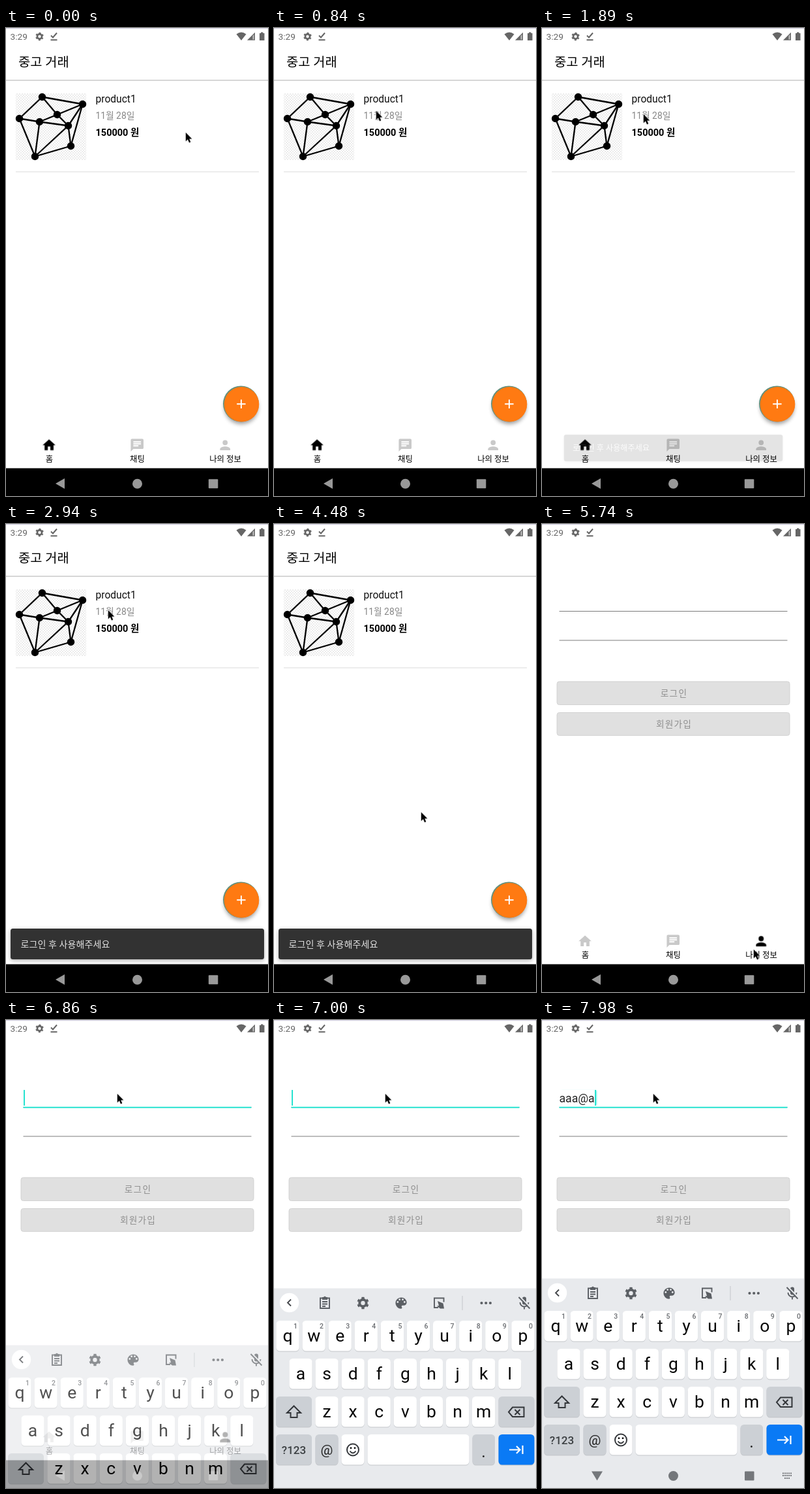
These frames come from a looping animation (402 px wide and 716 px high, 8 s). An HTML page:

```html
<!DOCTYPE html>
<html lang="ko">
<head>
<meta charset="utf-8">
<title>중고 거래</title>
<style>
  html, body { margin: 0; width: 100%; height: 100%; overflow: hidden; background: #fff; }
  #stage { position: relative; width: 402px; height: 716px; overflow: hidden; background: #fff; }
  svg { position: absolute; left: 0; top: 0; display: block; }
  svg, #typed { font-family: Roboto, 'Noto Sans CJK KR', 'Noto Sans CJK', sans-serif; }
  .mid { text-anchor: middle; }
  .label { font-size: 12.4px; text-anchor: middle; }
  .button { font-size: 13.7px; letter-spacing: 1.2px; text-anchor: middle; font-weight: 500; fill: #8e8e8e; }
  .key { font-size: 26.5px; text-anchor: middle; fill: #060606; }
  .hint { font-size: 10.5px; text-anchor: middle; font-weight: 500; fill: #6a6d71; }
  .line { fill: none; stroke: currentColor; }

  .loop { animation: 8s step-end infinite; }
  #home, .homeNav { animation-name: first; }
  #login, .loginNav { animation-name: second; }
  #focus, #typed { animation-name: focus; }
  #cursor { animation: move 8s linear infinite; }
  #ring { animation-name: click; }
  #snack { transform-origin: 201.5px 642.5px; animation: snackFade 8s linear infinite, snackScale 8s linear infinite; }
  #keyboard { animation-name: rise; }
  #systemNav { animation-name: dim; }
  #imeNav { animation-name: imeNav; }
  #tools { animation: tools 8s linear infinite; }
  #chevron { transform-origin: 23.5px 417.5px; animation-name: flip; }

  #typed { position: absolute; left: 26.5px; top: 107px; height: 24px; line-height: 26px; font-size: 17.6px; color: #222; }
  #typed span { display: block; height: 24px; overflow: hidden; white-space: pre; width: 0;
    border-right: 2px solid #26e2d0; box-shadow: 2px 0 2px -1px #7ff2e8; animation-name: type; }

  @keyframes first { 0% { opacity: 1 } 70.875%, 100% { opacity: 0 } }
  @keyframes second { 0% { opacity: 0 } 70.875%, 100% { opacity: 1 } }
  @keyframes focus { 0% { opacity: 0 } 82.25%, 100% { opacity: 1 } }
  @keyframes move {
    0% { translate: 276px 160px }
    2.625% { translate: 276px 160px; animation-timing-function: steps(7) }
    8.75% { translate: 157px 127px; animation-timing-function: step-end }
    19.25% { translate: 156px 132px; animation-timing-function: step-end }
    36.75% { translate: 157px 132px }
    39.375% { translate: 157px 132px; animation-timing-function: steps(6) }
    44.625% { translate: 225px 433px }
    49.875% { translate: 225px 433px; animation-timing-function: steps(2) }
    51.625% { translate: 226px 441px }
    56% { translate: 226px 441px; animation-timing-function: steps(11) }
    65.625% { translate: 321px 652px; animation-timing-function: steps(2) }
    67.375% { translate: 325px 651px }
    71.75% { translate: 325px 651px; animation-timing-function: steps(8) }
    78.75%, 100% { translate: 171px 113px }
  }
  @keyframes click {
    0%, 10.5%, 21%, 70.875%, 82.25%, 100% { opacity: 0 }
    8.75%, 19.25%, 69.125%, 80.5% { opacity: 1 }
  }
  @keyframes snackFade {
    0%, 23.3125%, 61.25%, 100% { opacity: 0 }
    25.8125%, 60.125% { opacity: 1 }
  }
  @keyframes snackScale {
    0% { scale: .8 }
    23.3125% { scale: .8; animation-timing-function: cubic-bezier(0, 0, .3, 1) }
    25.8125%, 100% { scale: 1 }
  }
  @keyframes rise {
    0% { translate: 0 321px; opacity: 0 }
    84.875% { translate: 0 165px; opacity: .35 }
    85.75% { translate: 0 102px; opacity: .7 }
    86.625% { translate: 0 48px; opacity: .9 }
    87.5% { translate: 0 15px; opacity: 1 }
    88.375%, 100% { translate: 0 0; opacity: 1 }
  }
  @keyframes dim { 0% { opacity: 1 } 84.875%, 100% { opacity: .5 } }
  @keyframes imeNav { 0% { opacity: 0 } 88.375%, 100% { opacity: 1 } }
  @keyframes type {
    0% { width: 0 }
    89.25% { width: .544em }
    91% { width: 1.088em }
    92.75% { width: 1.632em }
    95.375% { width: 2.53em }
    99.75%, 100% { width: 3.074em }
  }
  @keyframes tools {
    0%, 90.999% { opacity: 1 }
    91%, 95.5% { opacity: 0 }
    98%, 100% { opacity: 1 }
  }
  @keyframes flip { 0%, 96.25%, 100% { scale: 1 1 } 91% { scale: -1 1 } }
</style>
</head>
<body>
<div id="stage">
<svg width="402" height="716" viewBox="0 0 402 716">
  <defs>
    <pattern id="checker" width="4" height="4" patternUnits="userSpaceOnUse">
      <path fill="#fff" d="M0 0h4v4H0z"/><path fill="#ececec" d="M0 0h2v2H0zM2 2h2v2H2z"/>
    </pattern>
    <filter id="blur" x="-30%" y="-30%" width="160%" height="160%"><feGaussianBlur stdDeviation="3"/></filter>
    <g id="gear">
      <circle class="line" r="5.2" stroke-width="4"/>
      <circle class="line" r="7.8" stroke-width="2.8" pathLength="12" stroke-dasharray="1" stroke-dashoffset=".5" transform="rotate(30)"/>
    </g>
    <path id="house" d="M10 20v-6h4v6h5v-8h3L12 3 2 12h3v8z"/>
    <path id="chat" d="M20 2H4c-1.1 0-2 .9-2 2v18l4-4h14c1.1 0 2-.9 2-2V4c0-1.1-.9-2-2-2zM6 9h12v2H6zm8 5H6v-2h8zm4-6H6V6h12z"/>
    <path id="person" d="M12 12a4 4 0 1 0 0-8 4 4 0 0 0 0 8zm0 2c-2.7 0-8 1.3-8 4v2h16v-2c0-2.7-5.3-4-8-4z"/>
  </defs>

  <path stroke="#d6d4e4" stroke-width="1.5" d="M0 .5h402"/>
  <g fill="#666" color="#666">
    <text x="6.5" y="18" font-size="13.7">3:29</text>
    <use href="#gear" transform="translate(51.5 13) scale(.68)"/>
    <path class="line" stroke-width="2" d="M69 11.5l3 3 6-7M68.5 18.2h10"/>
    <path d="M353.5 9.5q7.5-6 15 0l-7.5 9.5z"/>
    <path d="M370 18.8l12-12v12z"/>
    <path fill="#fff" opacity=".6" d="M378.5 12v5.5h2V10z"/>
    <path d="M389 8h2V6.5h3.5V8h2v11h-7.5z"/>
  </g>

  <g id="home" class="loop">
    <text x="19" y="59" font-size="19.8" font-weight="500">중고 거래</text>
    <path stroke="#c9c9c9" stroke-width="1.6" d="M0 80h402"/>
    <path fill="url(#checker)" d="M15 100h108v102H15z"/>
    <g id="graph" stroke="#000" stroke-width="2.3"></g>
    <text x="137.5" y="113.5" font-size="15.6" fill="#111">product1</text>
    <text x="137.5" y="139" font-size="13.8" fill="#858585">11월 28일</text>
    <text x="137.5" y="165" font-size="14.5" font-weight="700">150000 원</text>
    <path stroke="#dcdcdc" stroke-width="1.2" d="M15 220h373"/>
    <circle cx="361" cy="580" r="26" opacity=".38" filter="url(#blur)"/>
    <circle cx="360.5" cy="575" r="27.5" fill="#63907c"/>
    <circle cx="361.5" cy="575.8" r="26.8" fill="#ff7a12"/>
    <path class="line" color="#fff" stroke-width="1.9" d="M354.2 575.3h13.4M360.9 568.6v13.4"/>
  </g>

  <g id="login" class="loop">
    <path stroke="#7d7d7d" stroke-width="1.2" d="M26.5 133.5h350M26.5 178h350"/>
    <path id="focus" class="loop" stroke="#26e2d0" stroke-width="2" d="M26.5 133.8h350"/>
    <g fill="#e0e0e0" stroke="#d2d2d2">
      <rect x="23" y="241" width="357" height="35.5" rx="3.5"/>
      <rect x="23" y="288.5" width="357" height="35" rx="3.5"/>
    </g>
    <text class="button" x="202.5" y="263.5">로그인</text>
    <text class="button" x="202.5" y="311">회원가입</text>
  </g>

  <g fill="#c9c9c9">
    <use href="#house" transform="translate(54.3 626.5) scale(.977)"/>
    <use href="#chat" transform="translate(189.5 626.5) scale(.977)"/>
    <use href="#person" transform="translate(324.5 626.5) scale(.977)"/>
  </g>
  <use class="loop homeNav" href="#house" transform="translate(54.3 626.5) scale(.977)"/>
  <use class="loop loginNav" href="#person" transform="translate(324.5 626.5) scale(.977)"/>
  <text class="label" x="66.5" y="664">홈</text>
  <text class="label" x="201.5" y="664">채팅</text>
  <text class="label" x="336.5" y="664">나의 정보</text>

  <g id="snack">
    <rect x="7" y="621" width="389" height="47" rx="4" opacity=".3" filter="url(#blur)"/>
    <rect x="7" y="619" width="389" height="47" rx="3.5" fill="#323232"/>
    <text x="22.5" y="647.5" font-size="14" letter-spacing=".1" fill="#e2e2e2">로그인 후 사용해주세요</text>
  </g>

  <path d="M0 673.5h402V716H0z"/>
  <g id="systemNav" class="loop" fill="#999">
    <path d="M76 697l14-8v16z"/><circle cx="201.5" cy="697.2" r="7.5"/><rect x="310.8" y="690.2" width="14.5" height="14" rx="1"/>
  </g>
</svg>

<div id="typed" class="loop"><span class="loop">aaa@a</span></div>

<svg width="402" height="716" viewBox="0 0 402 716">
  <g id="keyboard" class="loop">
    <path fill="#e8eaed" d="M0 395.5h402V716H0z"/>
    <circle cx="23.5" cy="417.5" r="14.7" fill="#fff"/>
    <path id="chevron" class="loop line" color="#44474b" stroke-width="1.9" d="M26 412.5l-5 5 5 5"/>
    <g id="tools" fill="#5b5f64" color="#5b5f64">
      <path class="line" stroke-width="1.9" d="M71 410.5h14v15.5H71zM74 416h8M74 419.5h8M74 423h5"/>
      <path d="M74 409h2.2a2 2 0 0 1 3.6 0H82v4h-8z"/>
      <use href="#gear" transform="translate(136.5 418)"/>
      <path transform="translate(183.5 406.5) scale(.96)" d="M12 3a9 9 0 0 0 0 18c.8 0 1.5-.7 1.5-1.5 0-.9-.8-1.2-.8-2 0-.8.7-1.5 1.5-1.5H16a5 5 0 0 0 5-5c0-4.4-4-8-9-8z"/>
      <g fill="#e8eaed"><circle cx="189.8" cy="416.5" r="1.4"/><circle cx="192.7" cy="412.7" r="1.4"/><circle cx="197.5" cy="412.7" r="1.4"/><circle cx="200.3" cy="416.5" r="1.4"/></g>
      <path class="line" stroke-width="1.9" d="M252 425h-6v-14.5h14.5v6"/>
      <path d="M251 415l8.5 3.5 1.5 8h-6l-5-4 3-.5z"/>
      <path stroke="#c3c6ca" d="M289 407v22"/>
      <circle cx="318.5" cy="418" r="2.1"/><circle cx="325.2" cy="418" r="2.1"/><circle cx="331.9" cy="418" r="2.1"/>
    </g>
    <g color="#5b5f64" stroke-width="1.9">
      <rect x="381" y="408.5" width="6" height="12" rx="3" fill="#5b5f64"/>
      <path class="line" d="M377.5 417a6.5 6.5 0 0 0 13 0M384 423.5v4"/>
      <path stroke="#e8eaed" stroke-width="2" d="M377 408l17 17"/>
      <path class="line" d="M375.5 409l17 17.5"/>
    </g>
    <g id="keys"></g>
    <g color="#33363a" stroke-width="2">
      <path class="line" d="M30.5 575.5l-10.5 10.5h5.5v7h10v-7h5.5z"/>
      <path class="line" d="M366 577.5h17.5v14.5H366l-6-7.2zM369.5 581l8 8M377.5 581l-8 8"/>
      <circle class="line" cx="121" cy="642.5" r="9"/>
      <path class="line" d="M116.5 644.5q4.5 6 9 0"/>
      <circle cx="118" cy="639.8" r="1.4"/><circle cx="124" cy="639.8" r="1.4"/>
    </g>
    <path class="line" color="#fff" stroke-width="2.2" d="M361 642.5h16M372 637l5.5 5.5-5.5 5.5M381.5 636v13"/>
    <g id="imeNav" class="loop" fill="#74777b">
      <path d="M76 690.5h17l-8.5 14z"/><circle cx="201.5" cy="697.5" r="7.5"/><rect x="311" y="690.5" width="14.5" height="14" rx="1"/>
      <path class="line" color="#74777b" stroke-width="2" stroke-dasharray="2 1" d="M369 693.5h15M369 697h15M372 701h9"/>
    </g>
  </g>

  <g id="cursor">
    <circle id="ring" class="loop line" r="22" color="#555" stroke-width="2"/>
    <path stroke="#fff" stroke-width="1.2" paint-order="stroke" transform="translate(-.3 0) scale(.94)"
      d="M0 0v14.3l3.3-3.1 2.3 5.3 2.5-1.1-2.3-5.1h4.5z"/>
  </g>
</svg>
</div>
<script>
  const byId = id => document.getElementById(id);

  const nodes = [[55, 105], [117, 116], [20, 138], [78, 132], [51, 143], [95, 149], [99, 180], [44, 196]];
  const edges = '01 02 03 13 15 16 24 27 34 35 45 47 56 57 67';
  byId('graph').innerHTML =
    edges.split(' ').map(([a, b]) => `<path d="M${nodes[a]}L${nodes[b]}"/>`).join('') +
    nodes.map(([x, y]) => `<circle cx="${x}" cy="${y}" r="4.6"/>`).join('');
  byId('graph').setAttribute('transform', 'translate(.5 .5)');

  const PITCH = 40.1;
  const grey = '#ccd0d5';
  const cap = (x, y, width, fill = '#fff') =>
    `<rect x="${x}" y="${y + 1}" width="${width}" height="46.5" rx="5.5" fill="#c3c6ca"/>` +
    `<rect x="${x}" y="${y}" width="${width}" height="46.5" rx="5.5" fill="${fill}"/>`;
  const letters = (row, firstX, y) => [...row].map((char, i) => {
    const x = firstX + i * PITCH;
    return cap(x - 17.6, y, 35.2) + `<text class="key" x="${x}" y="${y + 31.5}">${char}</text>`;
  }).join('');
  const hints = [...'1234567890'].map((digit, i) =>
    `<text class="hint" x="${33 + i * PITCH}" y="457">${digit}</text>`).join('');

  byId('keys').innerHTML =
    letters('qwertyuiop', 21, 445) + hints +
    letters('asdfghjkl', 41, 503) +
    letters('zxcvbnm', 81, 561) +
    cap(3, 561, 55, grey) + cap(344.5, 561, 55, grey) +
    cap(3, 619, 55, grey) + cap(63.5, 619, 35, grey) + cap(103.5, 619, 35) +
    cap(143.5, 619, 156) + cap(304.5, 619, 34.5, grey) + cap(344.5, 619, 55, '#0a7af5') +
    '<text class="mid" x="30.5" y="648.5" font-size="17" font-weight="500" fill="#3c4043">?123</text>' +
    '<text class="mid" x="81" y="650" font-size="21" fill="#222">@</text>' +
    '<text class="mid" x="321.5" y="654" font-size="25" fill="#222">.</text>';
</script>
</body>
</html>
```
